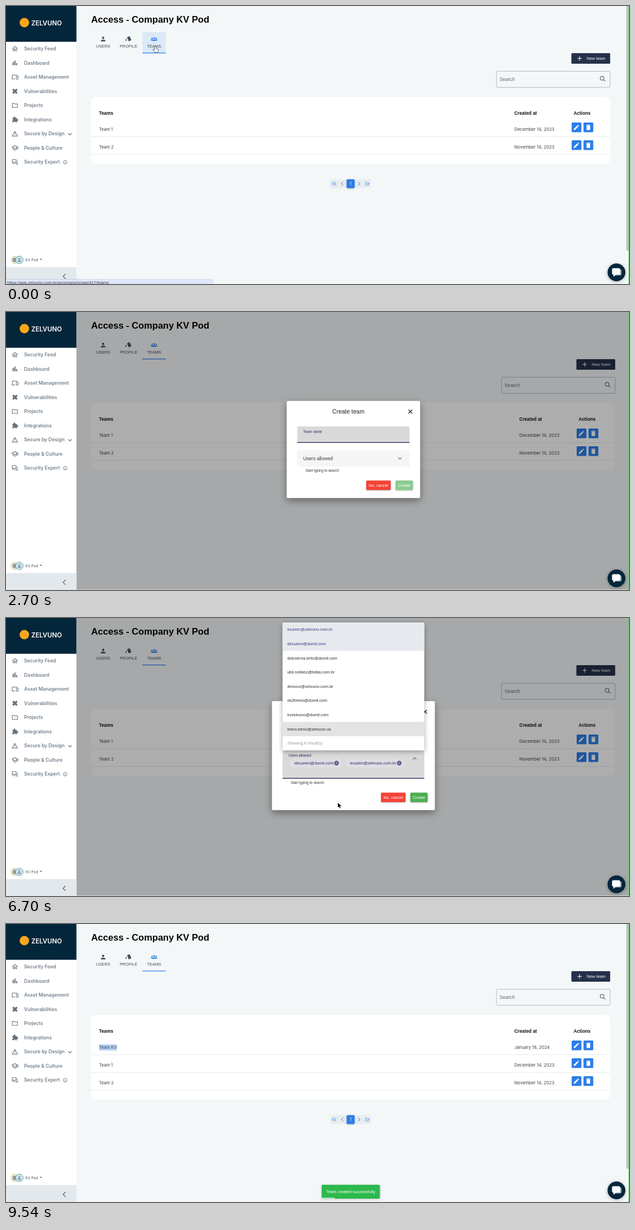
An HTML page with a canvas that plays this animation: 1119x501 px, repeating every 9680 ms.

```html
<!DOCTYPE html>
<html lang="en">
<head>
<meta charset="utf-8">
<title>Create a team</title>
<style>
html, body { margin: 0; width: 100%; height: 100%; overflow: hidden; background: #f4f7f8; }
canvas { display: block; }
</style>
</head>
<body>
<canvas id="stage" width="1119" height="501"></canvas>
<script>
const ctx = document.getElementById('stage').getContext('2d');
const LOOP = 9680;
const SANS = '400 # "Liberation Sans", Arial, sans-serif';
const BOLD = '700 # "Liberation Sans", Arial, sans-serif';
const ROUND = '400 # Inter, sans-serif';
const ROUND_BOLD = '600 # Inter, sans-serif';
const BLUE = '#2b7de9', NAVY = '#04263b', INK = '#2e2a66', SLATE = '#74818c';

const ICONS = {
  home: 'M3 12l9-8 9 8M6 10v9h4v-6h4v6h4v-9',
  bars: 'M4 9h4v11H4zM16 13h4v7h-4zM10 4h4v16h-4z',
  devices: 'M3 17V5h18M0 18.5h13M17 9h6v10h-6z',
  patch: 'M5 5l14 14M19 5L5 19',
  folder: 'M3 5h6l2 2h10v12H3z',
  puzzle: 'M3 6h5a3 3 0 1 1 5 0h6v5a3 3 0 1 1 0 5v5h-5a3 3 0 1 0-6 0H3v-5a3 3 0 1 0 0-6z',
  warn: 'M12 4L2.7 20h18.6zM12 10v4M12 16v2',
  school: 'M2 9l10-5 10 5-10 5.5zM6 11.5v5l6 3.3 6-3.3v-5M22 9v8',
  forum: 'M3 3h13v9H6l-3 3zM20 7v13l-3-3H7v-2',
  person: 'M12 12a4 4 0 1 0 0-8 4 4 0 0 0 0 8zM4 20v-2c0-5 16-5 16 0v2z',
  cards: 'M7 6l9-4 6 14-9 4zM5 9v10l-4-2z',
  plus: 'M12 4v16M4 12h16',
  search: 'M9.5 16a6.5 6.5 0 1 0 0-13 6.5 6.5 0 0 0 0 13zM14.5 14.5l6 6',
  edit: 'M3 17.2V21h3.8L17.8 10 14 6.2zM20.7 7l-1.8 1.9-3.8-3.8L17 3.3z',
  trash: 'M6 21h12V7H6zM19 4h-3.5l-1-1h-5l-1 1H5v2h14z',
  down: 'M6 9l6 6 6-6',
  up: 'M6 15l6-6 6 6',
  left: 'M15 5l-7 7 7 7',
  right: 'M9 5l7 7-7 7',
  first: 'M11 5l-7 7 7 7M20 5l-7 7 7 7',
  last: 'M4 5l7 7-7 7M13 5l7 7-7 7',
  close: 'M5 5l14 14M19 5L5 19',
  arrow: 'M0 0v17l4-4 3 7 3-1.5-3-6.5h6z',
  hand: 'M0 1a1.8 1.8 0 0 1 4 0v7l7 2q3 1 2 4l-2 6H1l-6-8q0-3 3-1l2 2z',
  beam: 'M-3-9q3 0 3 3q0-3 3-3M0-6V6M-3 9q3 0 3-3q0 3 3 3'
};
for (const name in ICONS) ICONS[name] = new Path2D(ICONS[name]);

const MENU = [['home', 'Security Feed'], ['bars', 'Dashboard'], ['devices', 'Asset Management'],
  ['patch', 'Vulnerabilities'], ['folder', 'Projects'], ['puzzle', 'Integrations'],
  ['warn', 'Secure by Design'], ['school', 'People & Culture'], ['forum', 'Security Expert']];
const FILLED = ['bars', 'puzzle'];
const EMAILS = ['inuzem@zelvuno.com.br', 'idnuzem@dumil.com', 'doluverna.brilo@dumil.com',
  'ubil.nolbiez@tolba.com.br', 'dmovur@zelvuno.com.br', 'ok2treino@dumil.com',
  'kvzelvuno@dumil.com', 'treno.treno@zelvuno.us'];
const TEAM = 'Team KV';
const TYPING = [[0, ''], [2200, 'T'], [2600, ''], [2800, 'T'], [3200, 'Te'], [3400, 'Team'],
  [3600, 'Team '], [3800, 'Team K'], [3900, TEAM]];
// time, x, y, pointer shape until the next stop
const POINTER = [[0, 267, 73, 'hand'], [100, 267, 73, 'arrow'], [600, 1036, 97, 'arrow'],
  [1000, 1036, 97, 'arrow'], [1400, 575, 224, 'beam'], [1900, 575, 224, ''],
  [3800, 575, 224, 'beam'], [4200, 561, 267, 'beam'], [5300, 561, 267, 'arrow'],
  [5600, 575, 58, 'arrow'], [5900, 575, 58, 'arrow'], [6100, 590, 22, 'arrow'],
  [6300, 590, 22, 'arrow'], [6700, 596, 333, 'arrow'], [6900, 596, 333, 'arrow'],
  [7300, 746, 321, 'arrow'], [8100, 746, 321, 'arrow'], [8600, 199, 222, 'beam'],
  [8800, 199, 222, 'beam'], [9200, 167, 222, 'beam'], [9400, 180, 3, '']];

const within = (t, from, to) => t >= from && t < to;
const clamp = v => Math.max(0, Math.min(1, v));

function rect(x, y, w, h, color, r = 0) {
  ctx.fillStyle = color;
  ctx.beginPath();
  ctx.roundRect(x, y, w, h, r);
  ctx.fill();
}

function disc(x, y, r, color, ring) {
  ctx.beginPath();
  ctx.arc(x, y, r, 0, 7);
  if (color) { ctx.fillStyle = color; ctx.fill(); }
  if (ring) { ctx.strokeStyle = ring; ctx.lineWidth = 1; ctx.stroke(); }
}

// y is the middle of the capitals
function text(s, x, y, size, color, font = SANS, align = 'left') {
  ctx.font = font.replace('#', size + 'px');
  ctx.textAlign = align;
  ctx.fillStyle = color;
  ctx.fillText(s, x, y + size * 0.35);
  return ctx.measureText(s).width;
}

function icon(name, x, y, size, color, weight = 0) {
  ctx.save();
  ctx.translate(x - size / 2, y - size / 2);
  ctx.scale(size / 24, size / 24);
  ctx.fillStyle = ctx.strokeStyle = color;
  ctx.lineWidth = weight;
  if (weight) ctx.stroke(ICONS[name]); else ctx.fill(ICONS[name]);
  ctx.restore();
}

function shadowed(blur, offset, alpha, draw) {
  ctx.save();
  ctx.shadowColor = `rgba(0,0,0,${alpha})`;
  ctx.shadowBlur = blur;
  ctx.shadowOffsetY = offset;
  draw();
  ctx.restore();
}

function pointerAt(t) {
  let i = POINTER.length - 1;
  while (POINTER[i][0] > t) i--;
  const [t0, x0, y0, kind] = POINTER[i];
  const [t1, x1, y1] = POINTER[i + 1] || [t0 + 1, x0, y0];
  const p = clamp((t - t0) / (t1 - t0)), e = p * p * (3 - 2 * p);
  return { x: x0 + (x1 - x0) * e, y: y0 + (y1 - y0) * e, kind };
}

function drawPointer({ x, y, kind }) {
  if (!kind) return;
  ctx.save();
  ctx.translate(x, y);
  ctx.scale(0.5, 0.5);
  ctx.lineJoin = 'round';
  const shape = ICONS[kind];
  if (kind === 'beam') {
    ctx.lineWidth = 2;
    ctx.strokeStyle = '#111';
    ctx.stroke(shape);
  } else {
    const hand = kind === 'hand';
    ctx.lineWidth = hand ? 2.4 : 3;
    ctx.strokeStyle = hand ? '#111' : '#fff';
    ctx.fillStyle = hand ? '#fff' : '#000';
    ctx.stroke(shape);
    ctx.fill(shape);
  }
  ctx.restore();
}

function drawSidebar() {
  rect(0, 0, 126.5, 501, '#fff');
  rect(0, 0, 126.5, 64.5, NAVY);
  disc(33, 30, 8.5, '#f9a61a');
  text('ZELVUNO', 45.5, 30.5, 11.6, '#fff', ROUND_BOLD);
  MENU.forEach(([name, label], i) => {
    const y = 77 + i * 25.55;
    const weight = FILLED.includes(name) ? 0 : name === 'patch' ? 6.5 : 2;
    icon(name, 16, y, 12.5, '#64717c', weight);
    text(label, 32.5, y, 8.6, SLATE, ROUND_BOLD);
  });
  icon('down', 115, 231, 12, '#64717c', 2.4);
  disc(106.3, 281.5, 3.3, null, SLATE);
  rect(105.8, 280.8, 1, 2.6, SLATE);
  disc(16, 457.5, 6.5, '#e4e4d2', '#d8c67a');
  rect(12.5, 454, 5, 7, '#8d9499');
  disc(24, 457.5, 6.8, '#cfe3ea', '#58a8bb');
  icon('person', 24, 457.5, 9.5, '#7c8a94');
  text('KV Pod', 35, 457.5, 6.4, '#44505a', ROUND);
  icon('down', 62.5, 456.8, 8.5, '#44505a');
  rect(0, 470.5, 126.5, 31, '#e2e8ec');
  icon('left', 105, 487.3, 15, '#465562', 1.9);
}

function drawTab(name, label, x, active) {
  const color = active ? BLUE : '#46515c';
  if (active) {
    icon('person', x - 3.7, 59.5, 7.5, color);
    icon('person', x + 3.7, 59.5, 7.5, color);
    icon('person', x, 59.5, 10, color);
  } else icon(name, x, 59.5, 12.5, color);
  text(label, x, 72.5, 7.4, '#414d58', SANS, 'center');
}

function drawTable(t, shift, pointer) {
  const rows = [['Team 1', 'December 14, 2023'], ['Team 2', 'November 14, 2023']];
  if (t >= 8200) rows.unshift([TEAM, 'January 18, 2024']);
  const bottom = 219.8 + rows.length * 32.15;
  rect(153, 164, 932 + shift, bottom - 164, '#fff', 8);
  text('Teams', 167, 193.5, 8.3, '#111', BOLD);
  text('Created at', 913 + shift, 193.5, 8.3, '#111', BOLD);
  text('Actions', 1019.5 + shift, 193.5, 8.3, '#111', BOLD);
  rows.forEach(([name, date], i) => {
    const y = 222.5 + i * 32.1;
    if (name === TEAM && t >= 8800) {
      const left = t >= 9200 ? 167 : pointer.x;
      rect(left, y - 5.5, 199 - left, 11, '#b4d5f7');
    }
    text(name, 167, y, 7.6, '#38434d', ROUND);
    text(date, 913 + shift, y, 7.8, '#38434d', ROUND);
    rect(153, y + 12.5, 932 + shift, 1, '#e6eaec');
    ['edit', 'trash'].forEach((action, k) => {
      const x = 1016 + shift + k * 21.3;
      rect(x, y - 12.5, 17.5, 17.5, BLUE, 1.5);
      icon(action, x + 8.7, y - 3.8, 13, '#fff');
    });
  });
  const cx = 619 + shift / 2, cy = bottom + 36.2;
  rect(cx - 36.5, cy - 8, 73, 16, '#e9edf0', 2);
  ['first', 'left', 'right', 'last'].forEach((name, i) =>
    icon(name, cx + [-29.7, -14.8, 14.8, 29.7][i], cy, 11, '#5e9bea', 2.4));
  shadowed(3, 1, 0.25, () => rect(cx - 7.2, cy - 8, 14.4, 16, BLUE, 2));
  text('1', cx, cy, 7, '#fff', ROUND, 'center');
}

function drawPage(t, shift, pointer) {
  rect(0, 0, 1119, 501, '#f4f7f8');
  text('Access - Company KV Pod', 153, 24, 16.6, '#050505', BOLD);
  if (t < 200) rect(245, 47, 42, 38, '#dbe9f8');
  drawTab('person', 'USERS', 174.5, false);
  drawTab('cards', 'PROFILE', 220, false);
  drawTab('', 'TEAMS', 266, true);
  rect(245, 84, 42, 1.3, BLUE);

  rect(1015.5 + shift, 85, 69.7, 19, '#25314a', 1.5);
  if (within(t, 800, 1000)) rect(1015.5 + shift, 85, 64, 19, 'rgba(255,255,255,.26)', 1.5);
  icon('plus', 1030.3 + shift, 94.5, 12, '#fff', 2);
  text('New team', 1043 + shift, 94.7, 7.5, '#fff');

  ctx.strokeStyle = '#b3babf';
  ctx.lineWidth = 1;
  ctx.beginPath();
  ctx.roundRect(881 + shift, 117.5, 204, 29, 2);
  ctx.stroke();
  text('Search', 886.5 + shift, 132, 8.7, '#5f6a73');
  icon('search', 1072 + shift, 131.5, 12.5, '#5f6a73', 2.2);

  drawTable(t, shift, pointer);
  if (!shift) {
    rect(1113, 0, 5, 501, '#fafafa');
    rect(1114, 0, 4, 441, '#c3c5c6');
  }
}

function drawChip(label, x, y, color) {
  ctx.font = SANS.replace('#', '7.5px');
  const w = ctx.measureText(label).width;
  rect(x, y - 8.5, w + 25, 17, color, 8.5);
  text(label, x + 9, y, 7.5, INK);
  disc(x + w + 14.5, y, 4.2, '#5b588f');
  icon('close', x + w + 14.5, y, 5.5, '#fff', 2.6);
  return x + w + 30;
}

function drawField(x, y, w, h, label, floated, focused, line) {
  rect(x, y, w, h, focused ? '#d9d9d9' : '#f5f5f5', [2, 2, 0, 0]);
  if (focused) rect(x, y + h - 1.3, w, 1.3, '#211c56');
  else if (line) rect(x, y + h - 1, w, 1, '#8b8d8f');
  const color = focused ? INK : '#3a3a3a';
  if (floated) text(label, x + 10.5, y + 9, 6.5, color);
  else text(label, x + 10.5, y + 14.7, 8.5, color);
}

function drawButton(label, x, y, w, color, textColor = '#fff') {
  shadowed(3, 1, 0.3, () => rect(x, y, w, 17, color, 1.5));
  text(label, x + w / 2, y + 8.6, 7.4, textColor, SANS, 'center');
}

function drawList(t, x, bottom, w, chips, pointer) {
  const step = 25.6, top = bottom - step * 9;
  const over = Math.floor((pointer.y - top) / step);
  const hover = over < 8 ? over : t > 6300 ? 7 : -1;
  ctx.save();
  ctx.globalAlpha = t < 4900 ? 0.91 : 1;
  shadowed(8, 2, 0.35, () => rect(x, top, w, step * 9, t < 4900 ? '#f7f7f7' : '#fff', 2));
  EMAILS.forEach((email, i) => {
    const y = top + i * step;
    const chosen = chips.includes(email);
    if (chosen) rect(x, y, w, step, '#e6eaee');
    else if (i === hover) rect(x, y, w, step, '#e3e3e3');
    text(email, x + 8.5, y + step / 2, 7.4, chosen ? '#3b3880' : '#2b2b2b');
  });
  text('Showing 8 result(s)', x + 8.5, top + step * 8.5, 7.4, '#999');
  ctx.restore();
}

function drawDialog(t, open, pointer) {
  const chips = t >= 6200 ? [EMAILS[1], EMAILS[0]] : t >= 5800 ? [EMAILS[1]] : [];
  const wide = chips.length > 1;
  const x = wide ? 477.7 : 504.2, w = wide ? 292.6 : 239.6, right = x + w;
  const y = chips.length ? 149.8 : 160.3, h = chips.length ? 196.4 : 175;
  const fx = x + 19, fw = w - 38, nameY = y + 46, usersY = y + 88.7;
  const usersH = chips.length ? 51 : 29.5;
  const nameFocus = within(t, 1400, 4300), usersFocus = within(t, 4300, 6800);
  const name = TYPING.filter(k => k[0] <= t).pop()[1];

  ctx.save();
  ctx.globalAlpha = open < 1 ? 0.25 + open : 1;
  ctx.globalAlpha = Math.min(ctx.globalAlpha, open < 1 ? 0.94 : 1);
  const scale = 0.8 + 0.2 * open;
  ctx.translate(624, 247.8);
  ctx.scale(scale, scale);
  ctx.translate(-624, -247.8);

  shadowed(14, 5, 0.4, () => rect(x, y, w, h, '#fff', 2));
  text('Create team', 615, y + 19.5, 10.5, '#1d1d1d', SANS, 'center');
  icon('close', right - 17.6, y + 19.2, 11.5, '#111', t >= 7800 ? 2 : 2.8);

  drawField(fx, nameY, fw, 29.5, 'Team name', t >= 1400, nameFocus, true);
  const typed = text(name, fx + 10.5, nameY + 18.8, 7.4, '#222');
  if (within(t, 1700, 2400) || within(t, 2900, 4000)) rect(fx + 10.5 + typed, nameY + 14, 1, 10, '#222');
  if (name && t < 6800) rect(fx + fw - 21.5, nameY + 9.5, 9, 9, '#c4c4c4', 2);
  if (t >= 7800) disc(fx + fw - 13, nameY + 17.5, 0.9, '#444');

  drawField(fx, usersY, fw, usersH, 'Users allowed', t >= 4300, usersFocus, false);
  let chipX = fx + 12.3;
  for (const chip of chips) chipX = drawChip(chip, chipX, usersY + 23, usersFocus ? '#dedee3' : '#dddde3');
  if (usersFocus && !chips.length && Math.floor((t - 3800) / 500) % 2 === 0)
    rect(fx + 10.5, usersY + 14, 1, 10, '#222');
  if (open === 1) icon(usersFocus ? 'up' : 'down', fx + fw - 17.3, usersY + 14.7, 12.5, '#555', 2);
  text('Start typing to search', fx + 14.8, usersY + usersH + 7.6, 6.35, '#333');

  const pressed = t >= 7800, by = y + h - 31.5;
  drawButton('No, cancel', right - 96.7, by, 44, pressed ? '#f87d75' : '#f44336');
  drawButton('Create', right - 44, by, 31, chips.length && !pressed ? '#4caf50' : '#8acb8f',
    pressed ? '#a9d9ad' : '#fff');
  if (within(t, 4800, 6800)) drawList(t, fx, usersY, fw, chips, pointer);
  ctx.restore();
}

function drawToast(t) {
  shadowed(5, 1, 0.2, () => rect(567, 470, 104.5, 25, '#2db94d', 2));
  text('Team created successfully', 619.2, 482, 7.5, '#fff', SANS, 'center');
  rect(567, 493, 104 * clamp(1 - (t - 8000) / 2000), 2, 'rgba(255,255,255,.6)', 1);
}

function drawChat() {
  shadowed(6, 1, 0.3, () => disc(1096.5, 480, 16, NAVY));
  rect(1092.5, 474.5, 13, 11, '#9fb0bb', 2.5);
  rect(1088.5, 472.5, 14.5, 11.5, '#fff', 2.5);
  ctx.beginPath();
  ctx.moveTo(1091, 482);
  ctx.lineTo(1091, 488);
  ctx.lineTo(1097, 483);
  ctx.fill();
}

function draw(t) {
  const open = t < 8000 ? clamp((t - 800) / 150) : clamp(1 - (t - 7950) / 100);
  const pointer = pointerAt(t);
  const shift = open > 0 ? 9 : 0;
  drawPage(t, shift, pointer);
  if (open) {
    rect(126, 0, 992, 501, `rgba(0,0,0,${0.32 * Math.min(1, open + 0.25)})`);
    rect(126, 500, 992, 1, 'rgba(255,255,255,.5)');
    drawDialog(t, open, pointer);
  }
  if (t >= 8100) drawToast(t);
  drawSidebar();
  if (t < 300) {
    rect(-4, 492.5, 375.5, 12, '#aebad2', 3);
    rect(-4, 493, 375, 12, '#dfe7fb', 3);
    text('https://app.zelvuno.com.br/accesses/scope/417/teams', 2, 498, 7.6, '#3a4048');
  }
  drawChat();
  rect(1118, 0, 1, 501, '#62d96c');
  drawPointer(pointer);
}

function tick(now) {
  const t = now % LOOP;
  draw(t >= 9540 ? 9540 : Math.min(9400, Math.floor(t / 100) * 100));
  requestAnimationFrame(tick);
}
requestAnimationFrame(tick);
</script>
</body>
</html>
```
